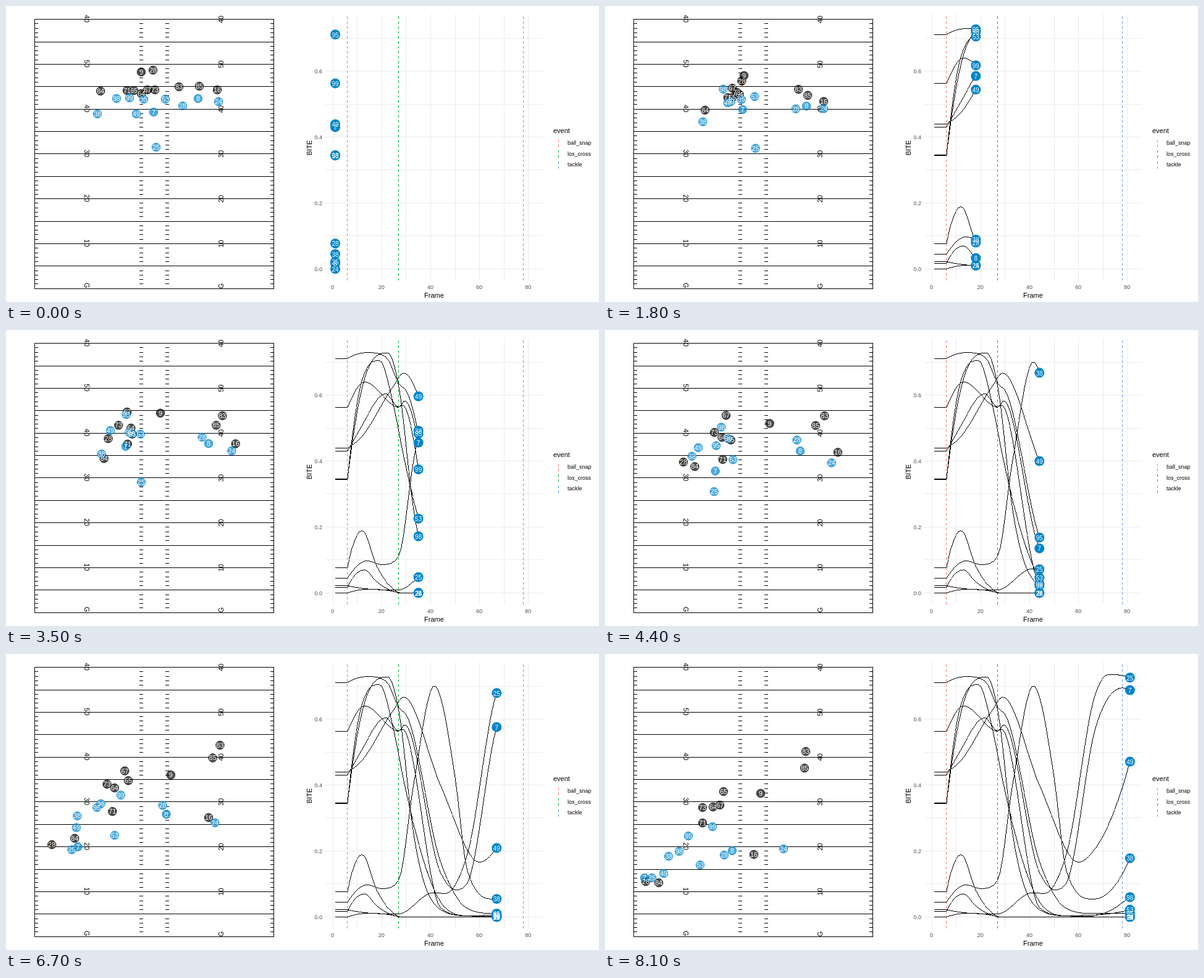
Write an HTML page with a canvas that moves like this. It is 960 px wide and 480 px high and loops after 8.2 s.

```html
<!DOCTYPE html>
<html lang="en">
<head>
<meta charset="utf-8">
<title>Play tracking and BITE</title>
<style>
html, body { margin: 0; width: 100%; height: 100%; overflow: hidden; background: #fff; }
canvas { display: block; }
</style>
</head>
<body>
<canvas id="stage" width="960" height="480"></canvas>
<script>
const ctx = document.getElementById('stage').getContext('2d');
const FONT = '"Liberation Sans", Arial, sans-serif';
const BLUE = '#0085ca', BLACK = '#000';
const RED = '#f8766d', GREEN = '#00ba38', SKY = '#619cff';
const LOOP = 8200, STEP = 100;
const SNAP = 6, CROSS = 27, TACKLE = 78;

const frameX = f => 528.55 + f * 3.96;
const biteY = v => 425.8 - v * 534.5;
const yardY = yard => 457.73 - yard * 7.276;
const clamp = (v, lo, hi) => Math.min(hi, Math.max(lo, v));

// Smooth curve through [time, value] points: turning points stay flat, ends hold.
function spline(points) {
  const ts = points.map(p => p[0]), vs = points.map(p => p[1]);
  const last = ts.length - 1;
  const h = ts.slice(1).map((t, i) => t - ts[i]);
  const d = h.map((len, i) => (vs[i + 1] - vs[i]) / len);
  const limit = (m, a, b) => Math.sign(a) * clamp(m * Math.sign(a), 0, 3 * Math.min(Math.abs(a), Math.abs(b)));
  const endSlope = (i, j) => limit(d[i] + (d[i] - d[j]) * h[i] / (h[i] + h[j]), d[i], d[i]);
  const m = ts.map((_, i) => {
    if (i === 0) return endSlope(0, 1);
    if (i === last) return endSlope(last - 1, last - 2);
    const a = d[i - 1], b = d[i];
    return a * b <= 0 ? 0 : limit((a * h[i] + b * h[i - 1]) / (h[i] + h[i - 1]), a, b);
  });
  return time => {
    const t = clamp(time, ts[0], ts[last]);
    let i = 0;
    while (i < last - 1 && t > ts[i + 1]) i++;
    const u = (t - ts[i]) / h[i], w = 1 - u;
    return vs[i] * (1 + 2 * u) * w * w + vs[i + 1] * u * u * (3 - 2 * u)
      + h[i] * u * w * (m[i] * w - m[i + 1] * u);
  };
}

// Each player waits for the snap, meets a block, breaks away and reaches the tackle.
const PHASES = [1, SNAP, 25, 49, 81];
const players = [];
function addPlayer(label, color, start, ...rest) {
  const path = [start, start, ...rest];
  const along = axis => spline(path.map((p, i) => [PHASES[i], p[axis]]));
  players.push({ label, color, x: along(0), y: along(1) });
}
const offense = (label, ...path) => addPlayer(label, BLACK, ...path);
const defense = (label, ...path) => addPlayer(label, BLUE, ...path);

offense(84, [153, 138], [166, 192], [138, 233], [87, 371]);
offense(71, [196, 137], [200, 161], [187, 222], [158, 274]);
offense(65, [207, 137], [205, 158], [203, 184], [192, 223]);
offense(64, [219, 142], [214, 147], [184, 183], [175, 248]);
offense(67, [229, 136], [196, 132], [196, 145], [186, 245]);
offense(73, [241, 136], [194, 145], [174, 174], [158, 249]);
offense(83, [280, 131], [336, 138], [356, 140], [325, 158]);
offense(85, [313, 130], [337, 153], [341, 156], [323, 185]);
offense(16, [342, 136], [363, 170], [378, 209], [241, 325]);
offense(9, [219, 107], [232, 120], [270, 161], [252, 226]);
offense(28, [238, 104], [203, 141], [110, 235], [66, 369]);
defense(98, [179, 150], [197, 128], [183, 172], [120, 320]);
defense(99, [200, 149], [205, 161], [197, 184], [174, 280]);
defense(95, [223, 151], [216, 153], [171, 200], [135, 295]);
defense(53, [258, 151], [230, 145], [201, 231], [154, 342]);
defense(28, [286, 162], [319, 171], [303, 185], [193, 326]);
defense(8, [311, 150], [333, 173], [307, 206], [206, 319]);
defense(24, [344, 155], [361, 178], [367, 227], [289, 316]);
defense(38, [148, 175], [163, 197], [134, 211], [103, 328]);
defense(49, [211, 175], [187, 149], [142, 208], [95, 356]);
defense(7, [239, 172], [209, 166], [168, 249], [64, 363]);
defense(25, [243, 229], [244, 235], [157, 272], [76, 363]);

// The ball goes from the center to the passer, then to the runner.
const [center, passer, runner] = [64, 9, 28].map(n => players.find(p => p.label === n));
function ballAt(f) {
  const mix = (a, b, u) => a + (b - a) * clamp(u, 0, 1);
  const at = axis => mix(mix(center[axis](SNAP), passer[axis](f), (f - SNAP) / 5), runner[axis](f), (f - 15) / 4);
  return [at('x'), at('y') + mix(0, 5, (f - SNAP) / 5) * (f < 19)];
}

// BITE over time, given by its turns.
const curves = [];
const curve = (label, ...turns) => curves.push({ label, value: spline(turns) });

curve(95, [SNAP, .711], [14, .729], [22, .713], [CROSS, .636], [30, .613], [44, .168], [55, .026], [67, .01]);
curve(98, [SNAP, .345], [11, .59], [22.5, .728], [CROSS, .625], [33, .254], [44, .022], [55, .004], [67, .006], [81, .06]);
curve(53, [SNAP, .344], [11, .617], [19, .705], [25, .563], [29, .413], [44, .046], [55, .004], [81, .022]);
curve(99, [SNAP, .563], [13, .64], [CROSS, .563], [28.5, .57], [44, .028], [55, .003], [81, 0]);
curve(7, [SNAP, .43], [11, .495], [21.5, .604], [CROSS, .563], [29.4, .583], [44, .135], [50, .082], [55, .102], [67, .576], [78, .695], [81, .688]);
curve(49, [SNAP, .439], [11, .467], [25, .63], [29, .667], [44, .4], [60, .166], [67, .209], [81, .471]);
curve(28, [SNAP, .077], [12, .189], [18, .08], [CROSS, 0]);
curve(38, [SNAP, .045], [14, .097], [20, .086], [CROSS, .113], [33, .4], [41.5, .701], [50, .423], [55, .14], [66, .054], [81, .178]);
curve(8, [SNAP, .016], [13, .07], [18, .033], [28, 0]);
curve(25, [SNAP, .022], [CROSS, .009], [41, .073], [46, .071], [55, .19], [67, .679], [72, .735], [81, .726]);
curve(24, [SNAP, 0], [14, .011], [CROSS, 0]);

function rect(x, y, w, h, color) {
  ctx.fillStyle = color;
  ctx.fillRect(Math.round(x), Math.round(y), w, h);
}

function text(str, x, y, size, color, align = 'center', angle = 0) {
  ctx.save();
  ctx.translate(x, y);
  ctx.rotate(angle);
  ctx.font = `${size}px ${FONT}`;
  ctx.textAlign = align;
  ctx.fillStyle = color;
  ctx.fillText(str, 0, size * 0.36);
  ctx.restore();
}

function disc(x, y, r, color) {
  ctx.fillStyle = color;
  ctx.beginPath();
  ctx.arc(x, y, r, 0, Math.PI * 2);
  ctx.fill();
}

function dashes(x, bottom, top, color) {
  for (let y = bottom; y - 4 >= top; y -= 8) rect(x, y - 4, 1, 4, color);
}

// One-pixel line without smoothing.
function pixelLine(x0, y0, x1, y1) {
  const n = Math.max(1, Math.round(Math.max(Math.abs(x1 - x0), Math.abs(y1 - y0))));
  for (let i = 0; i <= n; i++) rect(x0 + (x1 - x0) * i / n, y0 + (y1 - y0) * i / n, 1, 1, '#000');
}

function drawField() {
  for (let yard = 0; yard <= 60; yard++) {
    const y = yardY(yard);
    if (yard % 5 === 0) rect(46, y, 388, 1, '#000');
    for (const x of [46, 216, 258, 428]) rect(x, y, 6, 1, '#000');
  }
  for (const x of [46, 433]) rect(x, 21, 1, 438, '#000');
  for (let yard = 0; yard <= 60; yard += 10) {
    const label = yard ? 50 - Math.abs(50 - yard) : 'G';
    const y = yard ? yardY(yard) : 453.5;
    text(label, 131, y - 0.5, 11, '#000', 'center', Math.PI / 2);
    text(label, 348.5, y + 0.5, 11, '#000', 'center', -Math.PI / 2);
  }
}

function drawChart() {
  for (let f = 0; f <= 80; f += 10) rect(frameX(f), 13, 1, 432, '#ebebeb');
  for (let i = 0; i < 8; i++) rect(517, biteY(i / 10), 352, 1, '#ebebeb');
  for (let i = 0; i < 4; i++) text((i / 5).toFixed(1), 512, biteY(i / 5) + 1, 9, '#4d4d4d', 'right');
  for (let f = 0; f <= 80; f += 20) text(f, frameX(f), 456, 9, '#4d4d4d');
  text('Frame', 693, 469, 11, '#000');
  text('BITE', 491, 230, 11, '#000', 'center', -Math.PI / 2);
  text('event', 886, 202, 11, '#000', 'left');
  const events = [['ball_snap', SNAP, RED], ['los_cross', CROSS, GREEN], ['tackle', TACKLE, SKY]];
  events.forEach(([name, f, color], i) => {
    dashes(frameX(f), 445, 13, color);
    dashes(894, 229 + i * 17.3, 210 + i * 17.3, color);
    text(name, 909, 222 + i * 17.4, 9, '#000', 'left');
  });
}

function drawPlayers(f) {
  ctx.globalAlpha = 0.8;
  disc(...ballAt(f), 4.2, '#a0561a');
  ctx.globalAlpha = 0.7;
  ctx.lineWidth = 1;
  for (const p of players) {
    disc(p.x(f), p.y(f), 6.8, p.color);
    ctx.strokeStyle = p.color;
    ctx.stroke();
  }
  ctx.globalAlpha = 1;
  for (const p of players) text(p.label, p.x(f), p.y(f), 11, '#fff');
}

function drawCurves(f) {
  const y = (c, i) => biteY(c.value(i));
  for (const c of curves) {
    for (let i = 1; i < f; i++) pixelLine(frameX(i), y(c, i), frameX(i + 1), y(c, i + 1));
  }
  for (const c of curves) disc(frameX(f) + 0.5, y(c, f) + 0.5, 8, BLUE);
  for (const c of curves) text(c.label, frameX(f) + 0.5, y(c, f) + 1.2, 10, '#fff');
}

function render(now) {
  const step = Math.floor((now % LOOP) / STEP);
  const f = step < 2 ? step + 1 : step;
  rect(0, 0, 960, 480, '#fff');
  drawField();
  drawChart();
  drawPlayers(f);
  drawCurves(f);
  requestAnimationFrame(render);
}
render(0);
</script>
</body>
</html>
```
